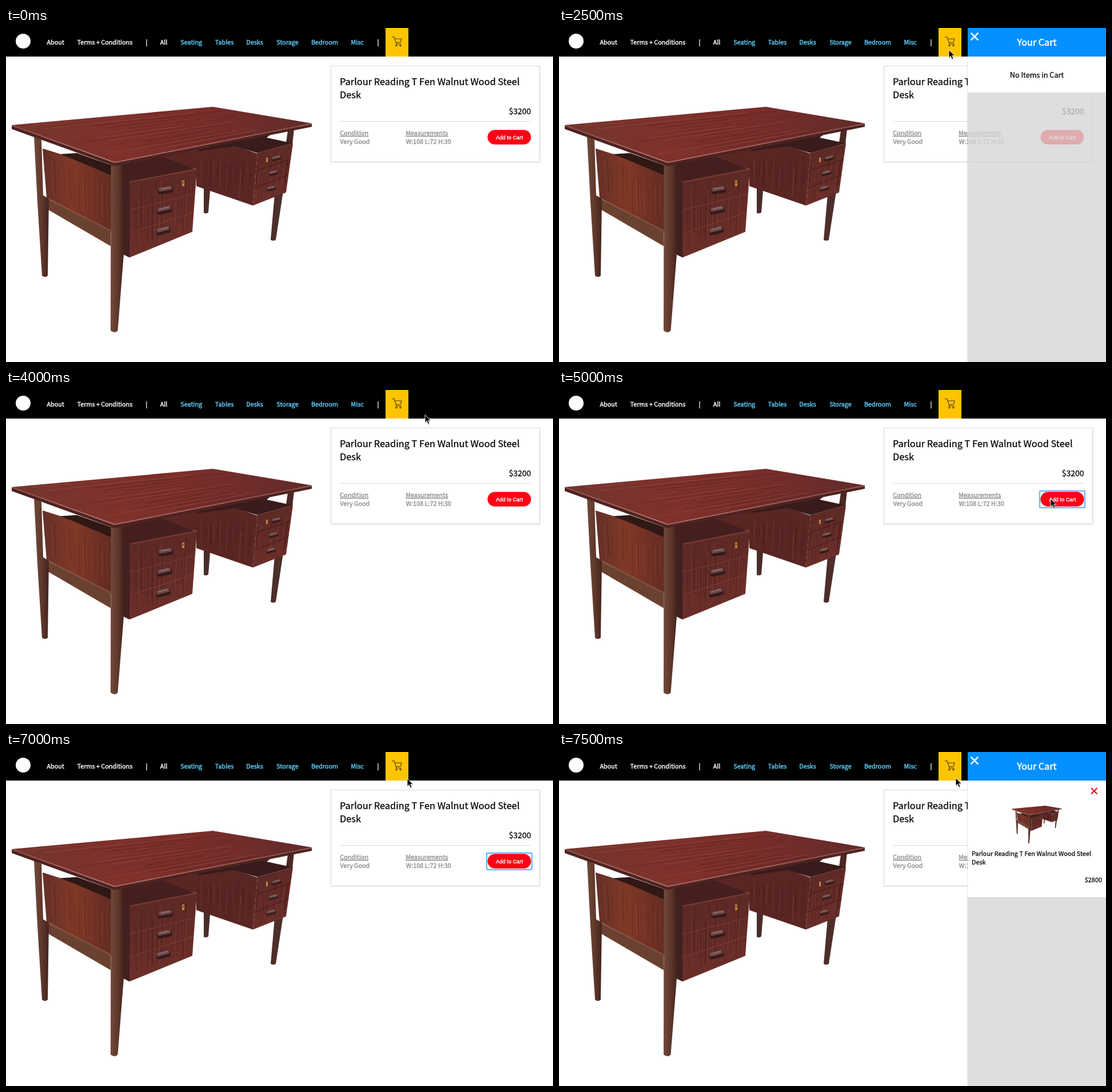
Animation of 957x585 px, one loop 8000 ms. Source, as an HTML page:

```html
<!DOCTYPE html>
<html lang="en">
<head>
<meta charset="utf-8">
<title>Furniture shop cart</title>
<style>
html, body { margin: 0; width: 100%; height: 100%; overflow: hidden; background: #fff; }
svg { display: block; width: 100vw; height: 100vh; }
text {
  font: 10.8px "Noto Sans CJK SC", "Noto Sans CJK JP", "Noto Sans CJK", "Noto Sans", sans-serif;
  fill: #000; stroke: #000; stroke-width: .25px;
}
.nav text { fill: #fff; stroke: #fff; stroke-width: .42px; }
.nav .link { fill: #5fd0ff; stroke: #5fd0ff; }
.title { font-size: 16.4px; }
.meta text { fill: #8c8c8c; stroke: #8c8c8c; stroke-width: .35px; }
.meta .head { text-decoration: underline; }
.price { font-size: 14px; text-anchor: end; }
.button { font: 9.3px "Liberation Sans", Arial, sans-serif; fill: #fff; stroke: #fff; stroke-width: .4px; }
.heading { font-size: 16.2px; fill: #fff; stroke: #fff; stroke-width: .6px; text-anchor: middle; }
.note { font-size: 12.7px; text-anchor: middle; }
.small { font-size: 10.9px; }
.end { text-anchor: end; }

#drawer, #empty, #item, #focus, #pointer { animation: 8s step-end infinite; }
#drawer { animation-name: drawer; }
#empty { animation-name: empty; }
#item { animation-name: item; }
#focus { animation-name: focus; }
#pointer { animation-name: pointer; }

@keyframes drawer {
  0%, 50% { visibility: hidden; }
  31.25%, 90.625%, 100% { visibility: visible; }
}
@keyframes empty {
  0%, 50%, 100% { visibility: hidden; }
  31.25% { visibility: visible; }
}
@keyframes item {
  0% { visibility: hidden; }
  90.625%, 100% { visibility: visible; }
}
@keyframes focus {
  0% { visibility: hidden; }
  62.5%, 100% { visibility: visible; }
}
@keyframes pointer {
  0% { transform: translate(-40px, 70px); }
  3.125% { transform: translate(779px, 70px); }
  6.25% { transform: translate(764px, 89px); }
  9.375% { transform: translate(760px, 93px); }
  12.5% { transform: translate(759px, 94px); }
  15.625% { transform: translate(702px, 58px); }
  18.75% { transform: translate(682px, 38px); }
  37.5% { transform: translate(693px, 31px); }
  40.625% { transform: translate(732px, 16px); }
  43.75% { transform: translate(730px, 16px); }
  46.875% { transform: translate(726px, 17px); }
  50% { transform: translate(733px, 43px); }
  53.125% { transform: translate(839px, 149px); }
  56.25% { transform: translate(860px, 191px); }
  59.375% { transform: translate(860px, 190px); }
  81.25% { transform: translate(831px, 186px); }
  84.375% { transform: translate(738px, 69px); }
  87.5% { transform: translate(702px, 46px); }
  90.625%, 100% { transform: translate(694px, 45px); }
}
</style>
</head>
<body>
<svg viewBox="0 0 957 585" preserveAspectRatio="none">
  <defs>
    <linearGradient id="topWood">
      <stop offset="0" stop-color="#73362d"/>
      <stop offset=".35" stop-color="#80312b"/>
      <stop offset=".65" stop-color="#7a2e2b"/>
      <stop offset="1" stop-color="#5f2b2b"/>
    </linearGradient>
    <linearGradient id="sideWood">
      <stop offset="0" stop-color="#643029"/>
      <stop offset=".45" stop-color="#813826"/>
      <stop offset="1" stop-color="#632c24"/>
    </linearGradient>
    <linearGradient id="frontWood" x2=".3" y2="1">
      <stop offset="0" stop-color="#592824"/>
      <stop offset="1" stop-color="#6c2f2a"/>
    </linearGradient>
    <linearGradient id="legWood">
      <stop offset="0" stop-color="#714a3a"/>
      <stop offset=".55" stop-color="#5f372b"/>
      <stop offset="1" stop-color="#43231d"/>
    </linearGradient>
    <g id="handle">
      <rect x="-13" y="-6" width="26" height="12" rx="4" fill="#34191a"/>
      <rect x="-12" y="-6" width="24" height="7" rx="3" fill="#6b4746"/>
      <path d="M-8-3.500H9" stroke="#9a7775" stroke-width="1.4"/>
    </g>
  </defs>

  <rect width="957" height="585" fill="#fff"/>

  <g id="desk">
    <!-- far legs and supports -->
    <path d="M346 280l11 5-3 38q-3 3-8 1z" fill="#4a2d29"/>
    <path d="M470 291l15-5-13 85q-4 3-9 0z" fill="#4d2e2a"/>
    <path d="M493 180l11-3-3 27-11-3z" fill="#4b2823"/>
    <!-- right pedestal -->
    <path d="M205 238l130-26 65-6 40 14-8 91-99-34v-30l-64-18z" fill="#592624"/>
    <path d="M335 211l130-26-9 7 46 10-62 17-40-12-65 9z" fill="#391b1b"/>
    <path d="M440 219l62-17-12 86-58 23z" fill="url(#frontWood)"/>
    <g class="grain"></g>
    <path d="M437 250l60-20M434 281l60-24" stroke="#3b1818"/>
    <use href="#handle" transform="translate(473 228) rotate(-14) scale(.65)"/>
    <use href="#handle" transform="translate(468 254) rotate(-14) scale(.65)"/>
    <use href="#handle" transform="translate(464 281) rotate(-14) scale(.65)"/>
    <path d="M455 227h3v8h-3z" fill="#b58a3a"/>
    <!-- left side -->
    <path d="M64 211l54 17 66 28v101l-113-60z" fill="url(#sideWood)"/>
    <path d="M94 221l30-2 60 21v18l-66-28z" fill="#301815"/>
    <path d="M61 293l122 62v27L63 312z" fill="#6a4130"/>
    <path d="M61 293l122 62" stroke="#8c5a44" stroke-width="1.5"/>
    <!-- left pedestal -->
    <path d="M200 238l70-14 64 24-118 23-16-5z" fill="#451f1e"/>
    <path d="M201 265l15 5v132l-12-6z" fill="#412020"/>
    <path d="M216 270l118-23-8 110-110 45z" fill="url(#frontWood)"/>
    <path d="M216 270l118-23" stroke="#7d3c35" stroke-width="2"/>
    <g class="grain"></g>
    <path d="M216 319l115-29M218 359l110-36" stroke="#87463e" stroke-width=".8"/>
    <use href="#handle" transform="translate(279 284) rotate(-9)"/>
    <use href="#handle" transform="translate(277 319) rotate(-12)"/>
    <use href="#handle" transform="translate(275 355) rotate(-15)"/>
    <path d="M308 267h4v10h-4z" fill="#b58a3a"/>
    <path d="M310 269v4" stroke="#35191a"/>
    <!-- near legs -->
    <path d="M49 190l13 6 3 97 10 6-2 135q-5 4-10 0l-8-129z" fill="url(#legWood)"/>
    <path d="M183.500 238h19l3.500 158-10.500 134q-5 6-12.500 0z" fill="url(#legWood)"/>
    <!-- table top -->
    <path d="M10 170l180 66 345-69v6l-345 69L10 177z" fill="#4d2321"/>
    <path d="M10 170l352-32 173 29-345 68z" fill="url(#topWood)"/>
    <g class="grain"></g>
    <path d="M10 171l180 65 345-68" fill="none" stroke="#9a5148" stroke-width="1.3"/>
  </g>

  <g class="nav">
    <rect width="957" height="50"/>
    <circle cx="30" cy="23" r="13" fill="#fff"/>
    <text x="71.500" y="29">About</text>
    <text x="124.600" y="29">Terms + Conditions</text>
    <text x="244.500" y="29">|</text>
    <text x="269.700" y="29">All</text>
    <text class="link" x="305.300" y="29">Seating</text>
    <text class="link" x="365.800" y="29">Tables</text>
    <text class="link" x="420.300" y="29">Desks</text>
    <text class="link" x="473.300" y="29">Storage</text>
    <text class="link" x="534" y="29">Bedroom</text>
    <text class="link" x="603.500" y="29">Misc</text>
    <text x="649.500" y="29">|</text>
    <rect x="664" width="40" height="50" fill="#ffc400"/>
    <g fill="none" stroke="#4a3a08" stroke-width="1.1">
      <path d="M675 15.500h4l4 12.500h8.500M680 19h12l-1.700 6-8.300.8"/>
      <circle cx="683" cy="30.700" r="1.200"/>
      <circle cx="690" cy="30.700" r="1.200"/>
    </g>
  </g>

  <g class="card">
    <rect x="568.500" y="67" width="365.500" height="168" fill="none" stroke="#000" stroke-opacity=".08" stroke-width="2"/>
    <rect x="568.500" y="66.500" width="365" height="168" fill="#fff" stroke="#d9d9d9"/>
    <text class="title" x="584" y="100.300">Parlour Reading T Fen Walnut Wood Steel</text>
    <text class="title" x="584" y="123">Desk</text>
    <text class="price" x="918.500" y="151">$3200</text>
    <path d="M584.500 163.700h333.500" stroke="#d4d4d4"/>
    <g class="meta">
      <text class="head" x="584.200" y="188">Condition</text>
      <text x="584.400" y="203">Very Good</text>
      <text class="head" x="699.300" y="188">Measurements</text>
      <text x="699.800" y="203">W:108 L:72 H:30</text>
    </g>
    <rect id="focus" x="841" y="177" width="79" height="29" rx="1.500" fill="none" stroke="#77b5f8" stroke-width="2.4"/>
    <rect x="842.500" y="178.500" width="76" height="25.500" rx="12.750" fill="#ff0015"/>
    <text class="button" x="857.200" y="195">Add to Cart</text>
  </g>

  <g id="drawer">
    <path d="M714.500 50v535" stroke="#000" stroke-opacity=".09"/>
    <rect x="715" width="242" height="50" fill="#0590ff"/>
    <path d="M720.500 8.500l13 13m0-13l-13 13" stroke="#e9f3ff" stroke-width="2.7"/>
    <text class="heading" x="836" y="31">Your Cart</text>
    <g id="empty">
      <rect x="715" y="50" width="242" height="63" fill="#fff"/>
      <rect x="715" y="113" width="242" height="472" fill="#d6d6d6" fill-opacity=".8"/>
      <text class="note" x="836" y="87">No Items in Cart</text>
    </g>
    <g id="item">
      <rect x="715" y="50" width="242" height="204" fill="#fff"/>
      <rect x="715" y="254" width="242" height="331" fill="#dedede"/>
      <path d="M931 63l10.500 10.500m0-10.500L931 73.500" stroke="#ea1626" stroke-width="2.3"/>
      <use href="#desk" transform="translate(790.3 71) scale(.167)"/>
      <text class="small" x="722" y="181.500">Parlour Reading T Fen Walnut Wood Steel</text>
      <text class="small" x="722" y="196.500">Desk</text>
      <text class="small end" x="950" y="228">$2800</text>
    </g>
  </g>

  <g id="pointer">
    <path d="M0 1.500v14l3.300-3 2.300 5.200 2.600-1.100-2.300-5h4.600z" fill="#000" opacity=".2" transform="translate(.3 1)"/>
    <path d="M0 .5v13.800l3.200-3 2.300 5.200 2.500-1.100-2.300-5h4.500z" fill="#000" stroke="#fff" stroke-width=".9"/>
  </g>
</svg>
<script>
let seed = 7;
const rand = () => (seed = seed * 16807 % 2147483647) / 2147483647;
const lerp = (a, b, t) => [a[0] + (b[0] - a[0]) * t, a[1] + (b[1] - a[1]) * t];

// Streaks running from edge a-b to edge c-d of a board.
function grain(node, [a, b, c, d], count, tones) {
  for (let i = 0; i < count; i++) {
    const t = (i + rand()) / count;
    const p = lerp(a, b, t), q = lerp(c, d, t);
    const from = rand() * .4, to = .6 + rand() * .4;
    const line = document.createElementNS("http://www.w3.org/2000/svg", "path");
    line.setAttribute("d", `M${lerp(p, q, from)}L${lerp(p, q, to)}`);
    line.setAttribute("stroke", tones[i % tones.length]);
    line.setAttribute("stroke-width", .6 + rand() * 1.4);
    line.setAttribute("opacity", .15 + rand() * .3);
    node.append(line);
  }
}

const [right, left, board] = document.querySelectorAll(".grain");
const tones = ["#301214", "#8a4037", "#3a181a"];
grain(right, [[336, 218], [436, 222], [336, 276], [430, 308]], 26, tones);
grain(right, [[442, 220], [500, 204], [434, 309], [489, 287]], 16, tones);
grain(left, [[218, 272], [332, 250], [218, 400], [325, 357]], 36, tones);
grain(left, [[72, 216], [180, 258], [76, 296], [180, 353]], 24, ["#4a1e19", "#9a4a30"]);
grain(board, [[18, 171], [186, 233], [362, 139], [530, 167]], 34, ["#4f1f1f", "#a35246", "#5a2423"]);
</script>
</body>
</html>
```
